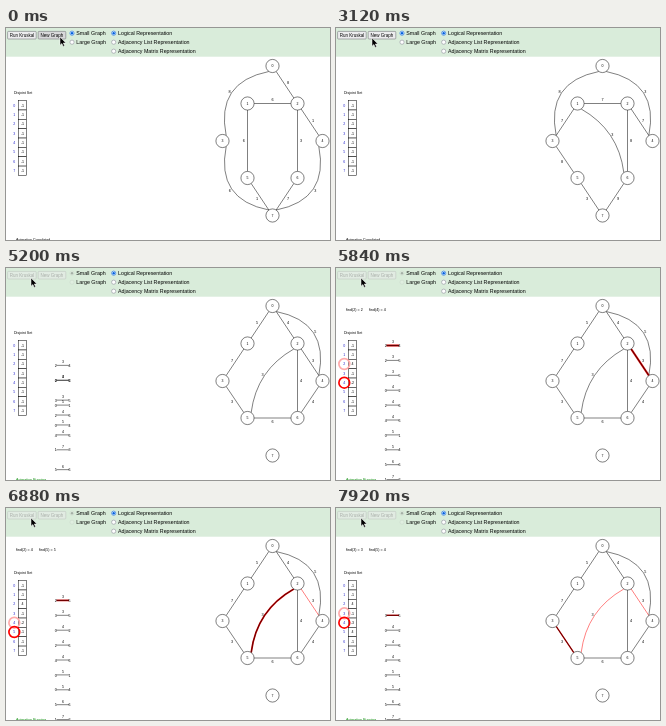
Recreate the animation shown at these times as an HTML page. Size 324 by 212 pixels, loop 8000 ms.

```html
<!DOCTYPE html>
<html lang="en">
<head>
<meta charset="utf-8">
<title>Kruskal visualization</title>
<style>
html, body { margin: 0; width: 100%; height: 100%; overflow: hidden; background: #fff; }
svg { display: block; width: 100vw; height: 100vh; }
text { font-family: "Liberation Sans", Arial, sans-serif; fill: #000; }
.edge { fill: none; stroke: #000; stroke-width: .5; }
.glow { fill: none; stroke: #c00; }
.node { fill: #fff; stroke: #000; stroke-width: .5; }
.cell { fill: #fff; stroke: #000; stroke-width: .5; }
</style>
</head>
<body>
<svg id="stage" viewBox="0 0 324 212"></svg>
<script>
const LOOP = 8000, STEP = 80;
const RUN = 4960, SORT_START = 5040, SORT_END = 5280;
const RADIUS = 6.6, CENTER = [266.5, 113];
const NODES = [[266.5, 38], [241.5, 75.5], [291.5, 75.5], [216.5, 113], [316.5, 113], [241.5, 150], [291.5, 150], [266.5, 187.5]];

// Edges: from, to, weight, bend
const OUTER = .5, INNER = .25;
const GRAPHS = [
  [[0, 2, 8], [0, 3, 8, OUTER], [1, 2, 6], [2, 4, 1], [1, 5, 6], [2, 6, 3], [4, 7, 3, -OUTER], [3, 7, 6, OUTER], [5, 7, 1], [6, 7, 7]],
  [[0, 3, 8, OUTER], [0, 4, 3, -OUTER], [1, 2, 7], [1, 3, 7], [2, 4, 7], [1, 6, 3, -INNER], [2, 6, 8], [3, 5, 8], [5, 7, 3], [6, 7, 9]],
  [[0, 1, 5], [0, 2, 4], [0, 4, 5, -OUTER], [1, 3, 7], [2, 4, 3], [2, 5, 3, INNER], [2, 6, 4], [3, 5, 3], [4, 6, 4], [5, 6, 6]]
];

const stage = document.getElementById('stage');
const set = (el, attrs) => { for (const key in attrs) el.setAttribute(key, attrs[key]); };
const show = (el, on) => el.setAttribute('visibility', on ? 'inherit' : 'hidden');
function add(parent, tag, attrs = {}, content) {
  const el = document.createElementNS('http://www.w3.org/2000/svg', tag);
  set(el, attrs);
  if (content !== undefined) el.textContent = content;
  parent.appendChild(el);
  return el;
}
const label = (parent, x, y, size, content, anchor = 'middle', fill = '#000') =>
  add(parent, 'text', { x, y: y + size * .36, 'font-size': size, 'text-anchor': anchor, style: `fill:${fill}` }, content);

// Header
add(stage, 'rect', { width: 324, height: 28.7, fill: '#d9ecda' });
function makeButton(x, width, content) {
  const box = add(stage, 'rect', { x, y: 3.4, width, height: 7.6, rx: .8, 'stroke-width': .6 });
  const text = label(stage, x + width / 2, 7.2, 4.5, content);
  return (hover, enabled) => {
    set(box, { fill: !enabled ? '#e1ebe2' : hover ? '#d8d8da' : '#ececee', stroke: enabled ? '#77777d' : '#c0c6c1' });
    text.style.fill = enabled ? '#000' : '#a9aea9';
  };
}
const runButton = makeButton(1.6, 28.6, 'Run Kruskal');
const newButton = makeButton(32.2, 27.6, 'New Graph');

function makeRadio(x, y, content, checked) {
  const ring = add(stage, 'circle', { cx: x, cy: y, r: 2.1, 'stroke-width': .6 });
  const dot = add(stage, 'circle', { cx: x, cy: y, r: checked ? 1.2 : 0 });
  label(stage, x + 4.3, y + .2, 5.3, content, 'start');
  return enabled => {
    set(ring, { fill: enabled ? '#fff' : '#dfeee0', stroke: !enabled ? '#cbd8cc' : checked ? '#0060df' : '#8f8f9d' });
    set(dot, { fill: enabled ? '#0060df' : '#a4b0a6' });
  };
}
const sizeRadios = [makeRadio(66, 5.2, 'Small Graph', true), makeRadio(66, 14.2, 'Large Graph')];
['Logical', 'Adjacency List', 'Adjacency Matrix'].forEach((name, i) =>
  makeRadio(107.7, 5.2 + 9 * i, name + ' Representation', i === 0)(true));

// Edges run between node rims; their weights sit on the side away from the centre
function edgeShape([from, to, , bend = 0]) {
  const [ax, ay] = NODES[from], [bx, by] = NODES[to];
  const length = Math.hypot(bx - ax, by - ay);
  const ux = (bx - ax) / length, uy = (by - ay) / length;
  const offset = (length - 2 * RADIUS) * bend;
  const cx = (ax + bx) / 2 - uy * offset, cy = (ay + by) / 2 + ux * offset;
  const mx = (ax + bx) / 2 - uy * offset / 2, my = (ay + by) / 2 + ux * offset / 2;
  const outward = Math.sign((CENTER[0] - mx) * uy + (my - CENTER[1]) * ux);
  const gap = (bend ? 2.3 : 3.6) * outward;
  return {
    d: `M${ax + ux * RADIUS} ${ay + uy * RADIUS}Q${cx} ${cy} ${bx - ux * RADIUS} ${by - uy * RADIUS}`,
    x: mx - uy * gap,
    y: my + ux * gap
  };
}
const graphs = GRAPHS.map(list => {
  const group = add(stage, 'g');
  const drawn = list.map(edge => {
    const { d, x, y } = edgeShape(edge);
    const glow = add(group, 'path', { d, class: 'glow', visibility: 'hidden' });
    const line = add(group, 'path', { d, class: 'edge' });
    label(group, x, y, 3.8, edge[2]);
    return { glow, line };
  });
  return { group, drawn };
});
NODES.forEach(([cx, cy], i) => {
  add(stage, 'circle', { cx, cy, r: RADIUS, class: 'node' });
  label(stage, cx, cy, 3.5, i);
});

// Disjoint set
const findLabels = [10, 33].map(x => label(stage, x, 41.7, 3.7, '', 'start'));
label(stage, 8, 65, 3.6, 'Disjoint Set', 'start');
const setY = i => 77.3 + 9.35 * i;
const cells = NODES.map((_, i) => {
  add(stage, 'rect', { x: 12.3, y: setY(i) - 4.67, width: 8.4, height: 9.35, class: 'cell' });
  label(stage, 8.2, setY(i), 3.6, i, 'middle', '#22c');
  return label(stage, 16.5, setY(i), 3.6, '-1');
});
const status = label(stage, 10, 212, 3.6, '', 'start');

// Edge list
const rowY = i => 77.5 + 14.9 * i;
const edges = GRAPHS[2];
const order = edges.map((_, i) => i).sort((a, b) => edges[a][2] - edges[b][2] || a - b);
const rows = edges.map(([from, to, weight]) => {
  const group = add(stage, 'g');
  const glow = add(group, 'path', { d: 'M50.5 0H63', class: 'glow' });
  add(group, 'path', { d: 'M50.5 0H63', class: 'edge' });
  label(group, 49.7, .3, 3.6, from);
  label(group, 63.4, .3, 3.6, to);
  label(group, 57, -3.4, 3.6, weight);
  return { group, glow };
});

// One round per edge; each find starts at a time and hops through set entries
const HOP = 150;
const ROUNDS = [
  { start: 5280, union: 5800, end: 5960, root: 4, child: 2,
    finds: [{ begin: 5320, path: [2] }, { begin: 5560, path: [4] }] },
  { start: 5990, union: 6900, end: 7040, root: 4, child: 5,
    finds: [{ begin: 6150, path: [2, 4] }, { begin: 6600, path: [5] }] },
  { start: 7050, union: LOOP, end: LOOP, root: 4, child: 3,
    finds: [{ begin: 7200, path: [3] }, { begin: 7500, path: [5, 4] }] }
];
const rings = ['#faa', '#f00'].map(stroke =>
  add(stage, 'circle', { r: 5.4, fill: 'none', stroke, 'stroke-width': 1.7 }));

function track(t, keys) {
  if (t <= keys[0][0]) return keys[0].slice(1);
  for (let i = 1; i < keys.length; i++) {
    const [t0, x0, y0] = keys[i - 1], [t1, x1, y1] = keys[i];
    if (t < t1) {
      const p = (t - t0) / (t1 - t0);
      return [x0 + (x1 - x0) * p, y0 + (y1 - y0) * p];
    }
  }
  return keys[keys.length - 1].slice(1);
}

const POINTER = [[2480, 54, 9], [2880, 37, 9.5], [3040, 37, 9.5], [3120, 36, 10], [3360, 36.5, 10], [3520, 37, 10],
  [3680, 37, 9.5], [4000, 27, 9.5], [4320, 25, 10]];
const pointer = add(stage, 'path', {
  d: 'M0 0V8.2L1.9 6.5L3.2 9.4L4.6 8.8L3.3 6H5.9Z', fill: '#000', stroke: '#fff', 'stroke-width': .5
});

function drawRounds(t) {
  const pulse = 1.7 + .5 * Math.cos((t - 6400) / 640 * 2 * Math.PI);
  const parents = Array(8).fill(-1);
  const texts = ['', ''];
  rings.forEach(ring => show(ring, false));
  ROUNDS.forEach(({ start, union, end, root, child, finds }, i) => {
    const active = t >= start && t < end;
    const done = t >= end;
    const row = rows[order[i]], edge = graphs[2].drawn[order[i]];
    for (const glow of [row.glow, edge.glow]) {
      show(glow, active);
      set(glow, { 'stroke-width': pulse });
    }
    edge.line.style.stroke = done ? '#f00' : '#000';
    show(row.group, t >= RUN && !done);
    if (t >= union) {
      parents[root] += parents[child];
      parents[child] = root;
    }
    if (!active) return;
    finds.forEach(({ begin, path }, side) => {
      if (t < begin) return;
      const keys = [[begin, side ? 63.4 : 50, rowY(i)],
        ...path.map((entry, n) => [begin + HOP * (n + 1), 8.3, setY(entry)])];
      const [cx, cy] = track(t, keys);
      const found = t >= begin + HOP * path.length;
      set(rings[side], { cx, cy });
      show(rings[side], true);
      texts[side] = `find(${edges[order[i]][side]}) = ${found ? path[path.length - 1] : ''}`;
    });
  });
  parents.forEach((value, i) => { cells[i].textContent = value; });
  findLabels.forEach((el, side) => { el.textContent = texts[side]; });
}

function draw(t) {
  const running = t >= RUN;
  const current = t < 720 ? 0 : t < 3680 ? 1 : 2;
  graphs.forEach(({ group }, i) => show(group, i === current));
  runButton(t >= 3840, !running);
  newButton(t < 720 || t >= 3680 && t < 3840, !running);
  sizeRadios.forEach(radio => radio(!running));
  status.textContent = running ? 'Animation Running' : 'Animation Completed';
  status.style.fill = running ? '#080' : '#000';

  const sorted = Math.min(1, Math.max(0, (t - SORT_START) / (SORT_END - SORT_START)));
  rows.forEach(({ group, glow }, i) => {
    const y = rowY(i) + (rowY(order.indexOf(i)) - rowY(i)) * sorted;
    set(group, { transform: `translate(0 ${y})` });
    show(group, running);
    show(glow, false);
  });
  drawRounds(t);
  set(pointer, { transform: `translate(${track(t, POINTER)})` });
}

const origin = performance.now();
function tick() {
  const t = (performance.now() - origin) % LOOP;
  draw(Math.floor(t / STEP) * STEP);
  requestAnimationFrame(tick);
}
draw(0);
requestAnimationFrame(tick);
</script>
</body>
</html>
```
